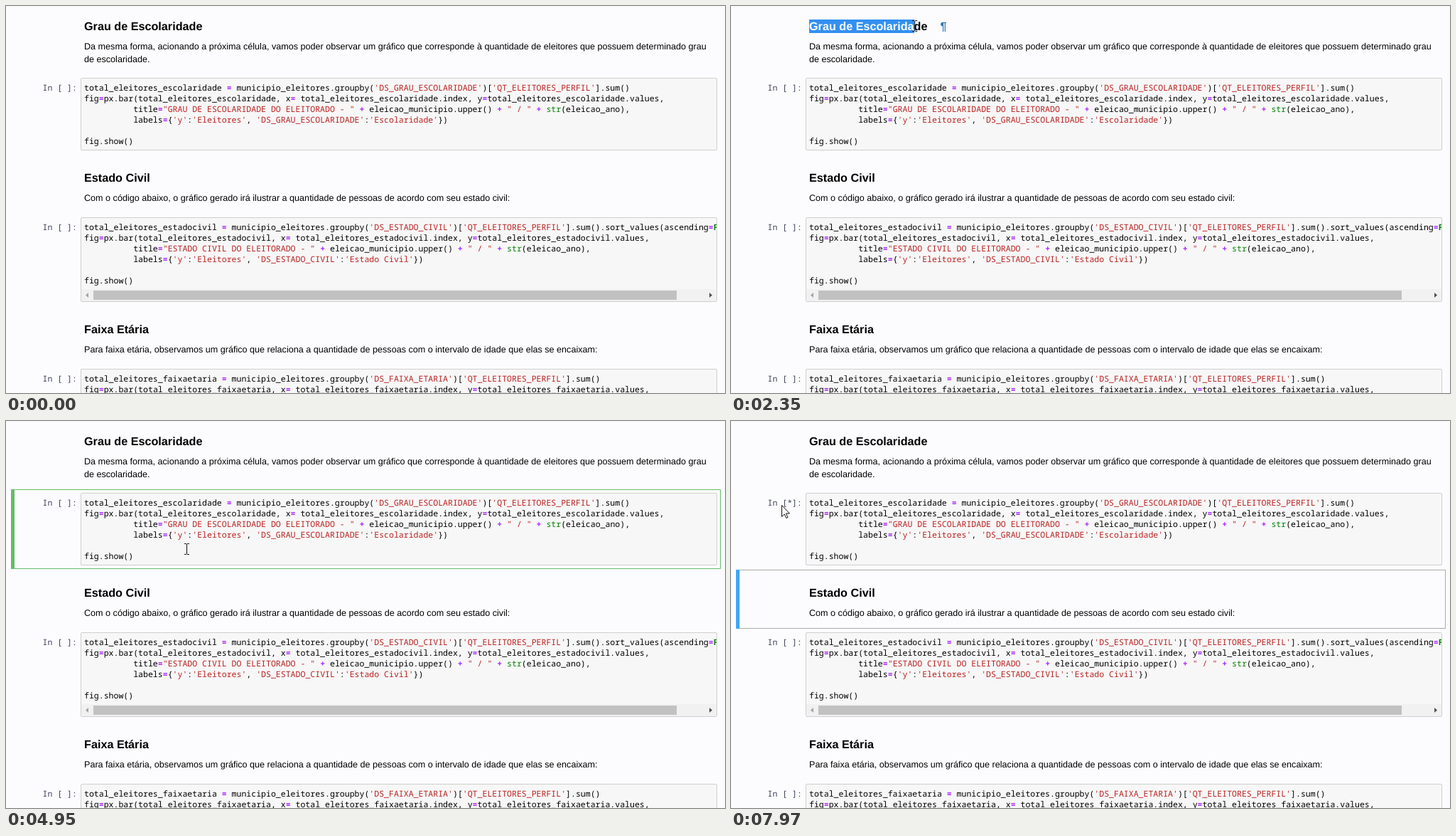
An HTML page that plays this animation: 1012x544 px, repeating every 8 s.

```html
<!DOCTYPE html>
<html lang="pt-BR">
<head>
<meta charset="utf-8">
<title>Caderno de eleitores</title>
<style>
html, body { margin: 0; width: 100%; height: 100%; overflow: hidden; background: #fcfcfe; }
svg { display: block; width: 1012px; height: 544px; }
text { white-space: pre; text-rendering: geometricPrecision; }
.title { font: bold 16.2px "Liberation Sans", Arial, sans-serif; }
.body { font: 12.6px "Liberation Sans", Arial, sans-serif; }
.code { font: 11.545px "Noto Sans Mono", monospace; }
.prompt { fill: #3f4459; }
.str { fill: #ba2121; }
.op { fill: #a2f; font-weight: bold; }
.builtin { fill: #008000; }
.kw { fill: #008000; font-weight: bold; }
.box { fill: #f7f7f7; stroke: #cfcfcf; }
.edge { fill: none; stroke: #f8f8f9; }
.frame { fill: none; stroke: #ababab; }
.command .bar { fill: #42a5f5; }
.edit .bar { fill: #66bb6a; }
.edit .frame { stroke: #66bb6a; }

/* One loop is 8 s, so 1% is 80 ms. */
.pilcrow, .cell, .star, .caret, #selection { animation: 8s step-end infinite; }
.pilcrow { fill: #337ab7; animation-name: pilcrow; }
.first { animation-name: first; }
.edit { animation-name: edit; }
.next, .star { animation-name: executed; }
.caret { animation-name: caret; }
#selection { animation-name: drag; }
#arrow { animation: arrow-path 8s linear infinite, arrow-show 8s step-end infinite; }
#beam { animation: beam-path 8s linear infinite, beam-show 8s step-end infinite; }

@keyframes pilcrow { 0%, 49% { opacity: 0 } 12.1% { opacity: 1 } }
@keyframes first { 0%, 55% { opacity: 0 } 35.125% { opacity: 1 } }
@keyframes edit { 0%, 71.375% { opacity: 0 } 55% { opacity: 1 } }
@keyframes executed { 0% { opacity: 0 } 71.375%, 100% { opacity: 1 } }
@keyframes caret { 0%, 61.6%, 71.375% { opacity: 0 } 55%, 68.1% { opacity: 1 } }
@keyframes drag {
  0% { clip-path: polygon(0 0, 0 0, 0 100%, 0 100%) }
  22.5% { clip-path: polygon(0 0, 0 0, 0 100%, 0 100%); animation-timing-function: steps(18) }
  29.375% { clip-path: polygon(0 0, 148px 0, 148px 100%, 0 100%); animation-timing-function: steps(2) }
  30.6% { clip-path: polygon(0 0, 167px 0, 167px 100%, 0 100%) }
  44.5%, 100% { clip-path: polygon(0 0, 0 0, 0 100%, 0 100%) }
}
@keyframes arrow-show { 0%, 12.1% { opacity: 0 } 1.625%, 91% { opacity: 1 } }
@keyframes beam-show { 0%, 91% { opacity: 0 } 12.1% { opacity: 1 } }
@keyframes arrow-path {
  0%, 1.625% { transform: translate(-13px, 96px) }
  5.25% { transform: translate(-4px, 31px) }
  12.1% { transform: translate(97px, 26px) }
  91% { transform: translate(104px, 140px) }
  96.5% { transform: translate(82px, 112px) }
  99.625%, 100% { transform: translate(71px, 118px) }
}
@keyframes beam-path {
  0%, 12.1% { transform: translate(100px, 30px) }
  15.75% { transform: translate(108px, 27px); animation-timing-function: step-end }
  18.375%, 22.5% { transform: translate(115px, 28px) }
  29.375% { transform: translate(258px, 28px) }
  31.25% { transform: translate(282px, 29px) }
  33%, 35.125% { transform: translate(280px, 30px) }
  42%, 48.5% { transform: translate(262px, 32px) }
  49.875% { transform: translate(258px, 150px) }
  53.5%, 86% { transform: translate(254px, 180px) }
  91%, 100% { transform: translate(106px, 140px) }
}
</style>
</head>
<body>
<svg id="stage" viewBox="0 0 1012 544"></svg>
<script>
const sections = [
  {
    top: 0, boxTop: 101, boxHeight: 102, title: 'Grau de Escolaridade',
    body: ['Da mesma forma, acionando a próxima célula, vamos poder observar um gráfico que corresponde à quantidade de eleitores que possuem determinado grau',
           'de escolaridade.'],
    name: 'escolaridade', column: 'DS_GRAU_ESCOLARIDADE', heading: 'GRAU DE ESCOLARIDADE', label: 'Escolaridade'
  },
  {
    top: 213, boxTop: 297, boxHeight: 119, title: 'Estado Civil',
    body: ['Com o código abaixo, o gráfico gerado irá ilustrar a quantidade de pessoas de acordo com seu estado civil:'],
    name: 'estadocivil', column: 'DS_ESTADO_CIVIL', heading: 'ESTADO CIVIL', label: 'Estado Civil',
    suffix: '.sort_values(ascending=False)'
  },
  {
    top: 426, boxTop: 510, boxHeight: 102, title: 'Faixa Etária',
    body: ['Para faixa etária, observamos um gráfico que relaciona a quantidade de pessoas com o intervalo de idade que elas se encaixam:'],
    name: 'faixaetaria', column: 'DS_FAIXA_ETARIA', heading: 'FAIXA ETÁRIA', label: 'Faixa Etária'
  }
];

const text = (x, y, cls, content) => `<text x="${x}" y="${y}" class="${cls}">${content}</text>`;

const tokens = /('[^']*'|"[^"]*")|\b(str)\b|\b(False)\b|([=+])/g;
const highlight = line => line.replace(tokens, (token, str, builtin, kw) => {
  const cls = str ? 'str' : builtin ? 'builtin' : kw ? 'kw' : 'op';
  return `<tspan class="${cls}">${token}</tspan>`;
});

function codeLines({ name, column, heading, label, suffix = '' }) {
  const series = `total_eleitores_${name}`;
  const indent = ' '.repeat(10);
  return [
    `${series} = municipio_eleitores.groupby('${column}')['QT_ELEITORES_PERFIL'].sum()${suffix}`,
    `fig=px.bar(${series}, x= ${series}.index, y=${series}.values,`,
    `${indent}title="${heading} DO ELEITORADO - " + eleicao_municipio.upper() + " / " + str(eleicao_ano),`,
    `${indent}labels={'y':'Eleitores', '${column}':'${label}'})`,
    '',
    'fig.show()'
  ];
}

function section(s) {
  const baseline = s.boxTop + 18;
  const code = codeLines(s).map((line, i) => text(110, baseline + 15 * i, 'code', highlight(line)));
  return text(110, s.top + 34, 'title', s.title)
    + s.body.map((line, i) => text(110, s.top + 61 + 18 * i, 'body', line)).join('')
    + text(51.5, baseline, 'code prompt', 'In [ ]:')
    + `<rect class="box" x="105.5" y="${s.boxTop + .5}" width="895" height="${s.boxHeight - 1}" rx="1.5"/>`
    + `<g clip-path="url(#code-clip)">${code.join('')}</g>`;
}

const cell = (cls, y, height) => `<g class="cell ${cls}">
  <rect class="frame" x="7.5" y="${y + .5}" width="998" height="${height - 1}"/>
  <rect class="bar" x="7" y="${y}" width="5" height="${height}"/></g>`;

const scrollbar = `
  <rect x="106" y="398" width="894" height="17" fill="#f1f1f1"/>
  <rect x="123" y="400" width="821" height="13" fill="#c1c1c1"/>
  <path d="M116 403v7l-4-3.500z" fill="#a3a3a3"/>
  <path d="M990 403v7l4-3.500z" fill="#505050"/>`;

const selection = `<g id="selection">
  <rect x="110" y="19" width="167" height="19" fill="#3390f0"/>
  <g fill="#fff">${text(110, 34, 'title', sections[0].title)}</g></g>`;

document.getElementById('stage').innerHTML = `
  <defs><clipPath id="code-clip"><rect x="106" y="0" width="894" height="544"/></clipPath></defs>
  <path class="edge" d="M0 1.500H1009M1009.500 0V544"/>
  ${sections.map(section).join('')}
  ${scrollbar}
  ${cell('command first', -10, 106)}
  ${cell('edit', 96, 112)}
  ${cell('command next', 209, 83)}
  ${text(79.2, 119, 'code prompt star', '*')}
  ${text(294.5, 34, 'title pilcrow', '¶')}
  ${selection}
  <path class="caret" d="M110.500 168v15" stroke="#000"/>
  <path id="arrow" d="M.5 .5V16.500L4.200 13L6.800 18.500L9 17.500L6.500 12H11.500Z" fill="#fff" stroke="#111"/>
  <path id="beam" d="M-3 -7.500H0M1 -7.500H4M.5 -7V7M-3 7.500H0M1 7.500H4" fill="none" stroke="#111"/>`;
</script>
</body>
</html>
```
